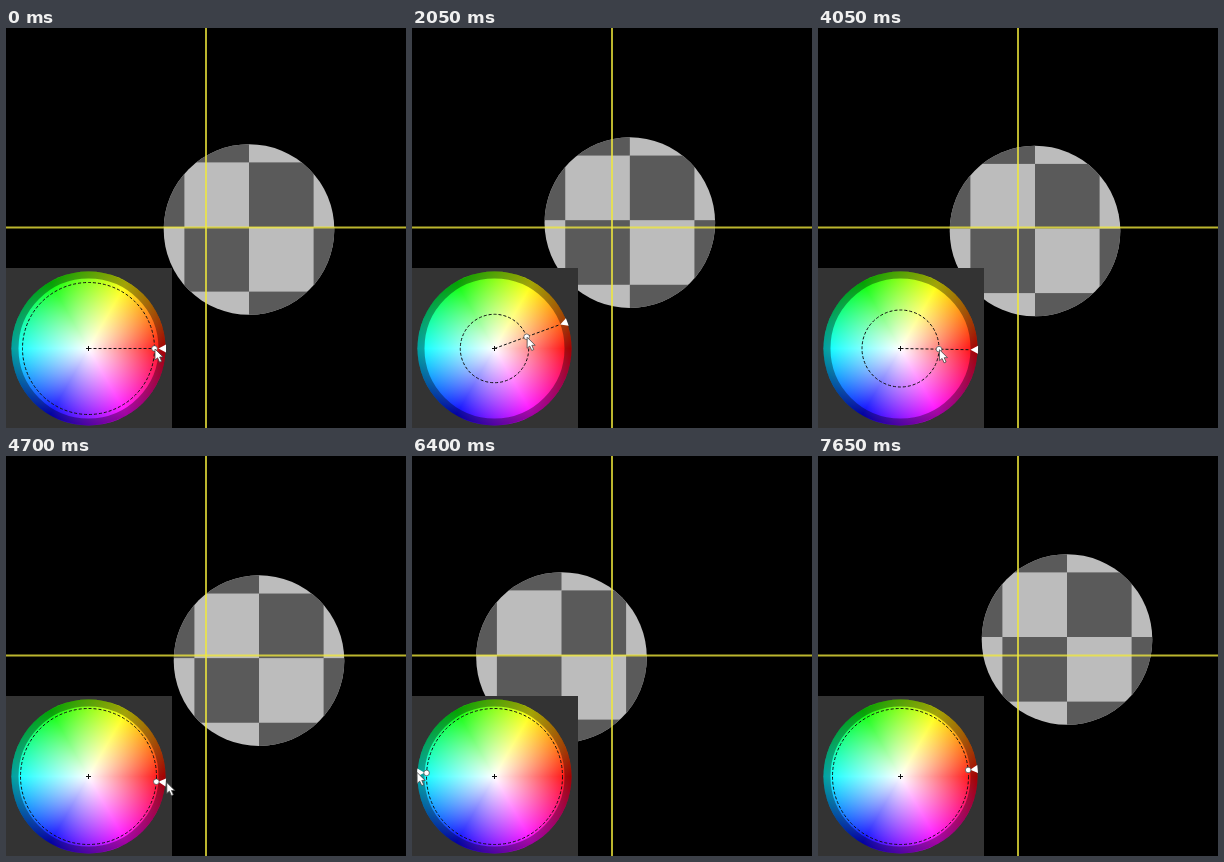
Animation of 400 by 400 pixels, one loop 7.7 s. Source, as an HTML page with a canvas:

```html
<!DOCTYPE html>
<html lang="en">
<head>
<meta charset="utf-8">
<title>Colour wheel offset</title>
<style>
  html, body { margin: 0; width: 100%; height: 100%; overflow: hidden; background: #000; }
  canvas { display: block; }
</style>
</head>
<body>
<canvas id="stage" width="400" height="400"></canvas>
<script>
const LOOP = 7700, STEP = 50;
const WHEEL = { x: 82.5, y: 320.5, r: 77, inner: 70 };
const BALL_R = 85.3, CELL = 64.6;
const ctx = document.getElementById('stage').getContext('2d');

// time, centre x, centre y
const ballKeys = [
  [0, 243, 201.5], [500, 230, 201.5], [850, 210, 201.5], [1150, 202.5, 201.5],
  [1400, 190, 206], [1650, 195, 203], [2000, 215, 196], [2450, 239, 181],
  [2650, 244, 174], [3100, 221, 195.5], [3300, 217, 201], [3650, 206, 202],
  [4050, 217, 203], [4400, 254, 196], [4850, 252, 211], [5500, 238.3, 238.3],
  [5650, 231, 250], [5900, 205, 273], [6150, 165, 255], [6400, 149.5, 201.5],
  [6600, 155, 155], [6900, 195, 128], [7250, 228, 159], [7650, 249, 183.5]
];

// time, angle in degrees, signed radius
const handleKeys = [
  [0, 0, 66], [500, -2, 45], [850, -6, 18], [1150, -35, 6],
  [1400, -22, -18], [1650, -20, -12], [2000, -20, 30], [2450, -22, 60],
  [2650, -24, 66], [3100, -15, 45], [3300, -4, 38], [3650, 0, 15],
  [4050, 1, 38.5], [4400, 0, 68], [4850, 8, 68], [5500, 30, 68],
  [5650, 50, 68], [6400, 183, 68], [6950, 225, 68], [7250, 252, 68],
  [7650, 354.5, 68]
];

// Cubic through the keys, flat at turning points
function slope(keys, i, c) {
  if (i === 0 || i === keys.length - 1) return 0;
  const [p, k, n] = [keys[i - 1], keys[i], keys[i + 1]];
  const a = (k[c] - p[c]) / (k[0] - p[0]);
  const b = (n[c] - k[c]) / (n[0] - k[0]);
  return a * b <= 0 ? 0 : 2 * a * b / (a + b);
}

function sample(keys, t) {
  let i = 0;
  while (i < keys.length - 2 && t >= keys[i + 1][0]) i++;
  const a = keys[i], b = keys[i + 1], d = b[0] - a[0];
  const u = Math.min(1, (t - a[0]) / d), v = 1 - u;
  return [1, 2].map(c =>
    a[c] * v * v * (1 + 2 * u) + b[c] * u * u * (3 - 2 * u) +
    d * u * v * (slope(keys, i, c) * v - slope(keys, i + 1, c) * u));
}

function disc(x, y, r) {
  ctx.beginPath();
  ctx.arc(x, y, r, 0, 2 * Math.PI);
}

function polygon(points) {
  ctx.beginPath();
  points.forEach(([x, y]) => ctx.lineTo(x, y));
  ctx.closePath();
}

function drawBall(x, y) {
  ctx.save();
  disc(x, y, BALL_R);
  ctx.fillStyle = '#bcbcbc';
  ctx.fill();
  ctx.clip();
  ctx.fillStyle = '#5a5a5a';
  for (let i = -2; i < 2; i++) {
    for (let j = -2; j < 2; j++) {
      if ((i + j) % 2) ctx.fillRect(x + i * CELL, y - 2.5 + j * CELL, CELL, CELL);
    }
  }
  ctx.restore();
}

function drawCross() {
  ctx.fillStyle = 'rgba(240, 232, 60, 0.78)';
  ctx.fillRect(199, 0, 2, 400);
  ctx.fillRect(0, 198.5, 400, 2);
}

const hues = ctx.createConicGradient(0, WHEEL.x, WHEEL.y);
['#f00', '#f0f', '#00f', '#0ff', '#0f0', '#ff0', '#f00']
  .forEach((c, i) => hues.addColorStop(i / 6, c));
const whiten = ctx.createRadialGradient(WHEEL.x, WHEEL.y, 0, WHEEL.x, WHEEL.y, WHEEL.r);
whiten.addColorStop(0, '#fff');
whiten.addColorStop(1, 'rgba(255, 255, 255, 0)');

function drawWheel() {
  const { x, y, r, inner } = WHEEL;
  ctx.fillStyle = '#333';
  ctx.fillRect(0, 240, 166, 160);
  disc(x, y, r);
  for (const paint of [hues, whiten]) {
    ctx.fillStyle = paint;
    ctx.fill();
  }
  disc(x, y, (r + inner) / 2);
  ctx.lineWidth = r - inner;
  ctx.strokeStyle = 'rgba(0, 0, 0, 0.36)';
  ctx.stroke();
}

function drawArrow(angle) {
  ctx.save();
  ctx.translate(WHEEL.x, WHEEL.y);
  ctx.rotate(angle);
  polygon([[70, 0], [77.5, -4], [77.5, 4]]);
  ctx.fillStyle = '#fff';
  ctx.fill();
  ctx.restore();
}

function drawCursor(x, y) {
  ctx.save();
  ctx.translate(x, y);
  polygon([[0, 0], [0, 11], [2.6, 8.8], [4.6, 13.2], [6.6, 12.3], [4.7, 8], [8, 8]]);
  ctx.fillStyle = '#fff';
  ctx.fill();
  ctx.lineWidth = 0.8;
  ctx.strokeStyle = '#444';
  ctx.stroke();
  ctx.restore();
}

function drawControls(t) {
  const { x, y } = WHEEL;
  const [deg, radius] = sample(handleKeys, t);
  const r = Math.abs(radius);
  const angle = deg * Math.PI / 180 + (radius < 0 ? Math.PI : 0);
  const at = d => [x + d * Math.cos(angle), y + d * Math.sin(angle)];
  const spinning = t >= 4400;

  ctx.strokeStyle = '#111';
  ctx.lineWidth = 1;
  ctx.setLineDash([3, 2]);
  disc(x, y, r);
  ctx.stroke();
  if (!spinning) {
    ctx.beginPath();
    ctx.moveTo(x, y);
    ctx.lineTo(...at(70));
    ctx.stroke();
  }
  ctx.setLineDash([]);
  ctx.fillStyle = '#111';
  ctx.fillRect(x - 2.5, y - 0.5, 5, 1);
  ctx.fillRect(x - 0.5, y - 2.5, 1, 5);

  drawArrow(angle);
  disc(...at(r), 2.8);
  ctx.fillStyle = '#fff';
  ctx.fill();
  ctx.lineWidth = 0.7;
  ctx.strokeStyle = '#444';
  ctx.stroke();

  if (t < 7300) {
    const [cx, cy] = at(spinning ? 78 : r);
    drawCursor(cx + 0.5, cy + (spinning ? 0 : 0.5));
  }
}

function draw(t) {
  ctx.fillStyle = '#000';
  ctx.fillRect(0, 0, 400, 400);
  drawBall(...sample(ballKeys, t));
  drawCross();
  drawWheel();
  drawControls(t);
}

const start = performance.now();
function tick() {
  const t = (performance.now() - start) % LOOP;
  const step = Math.floor(t / STEP) * STEP;
  draw(step < 100 ? 0 : step);
  requestAnimationFrame(tick);
}
tick();
</script>
</body>
</html>
```
